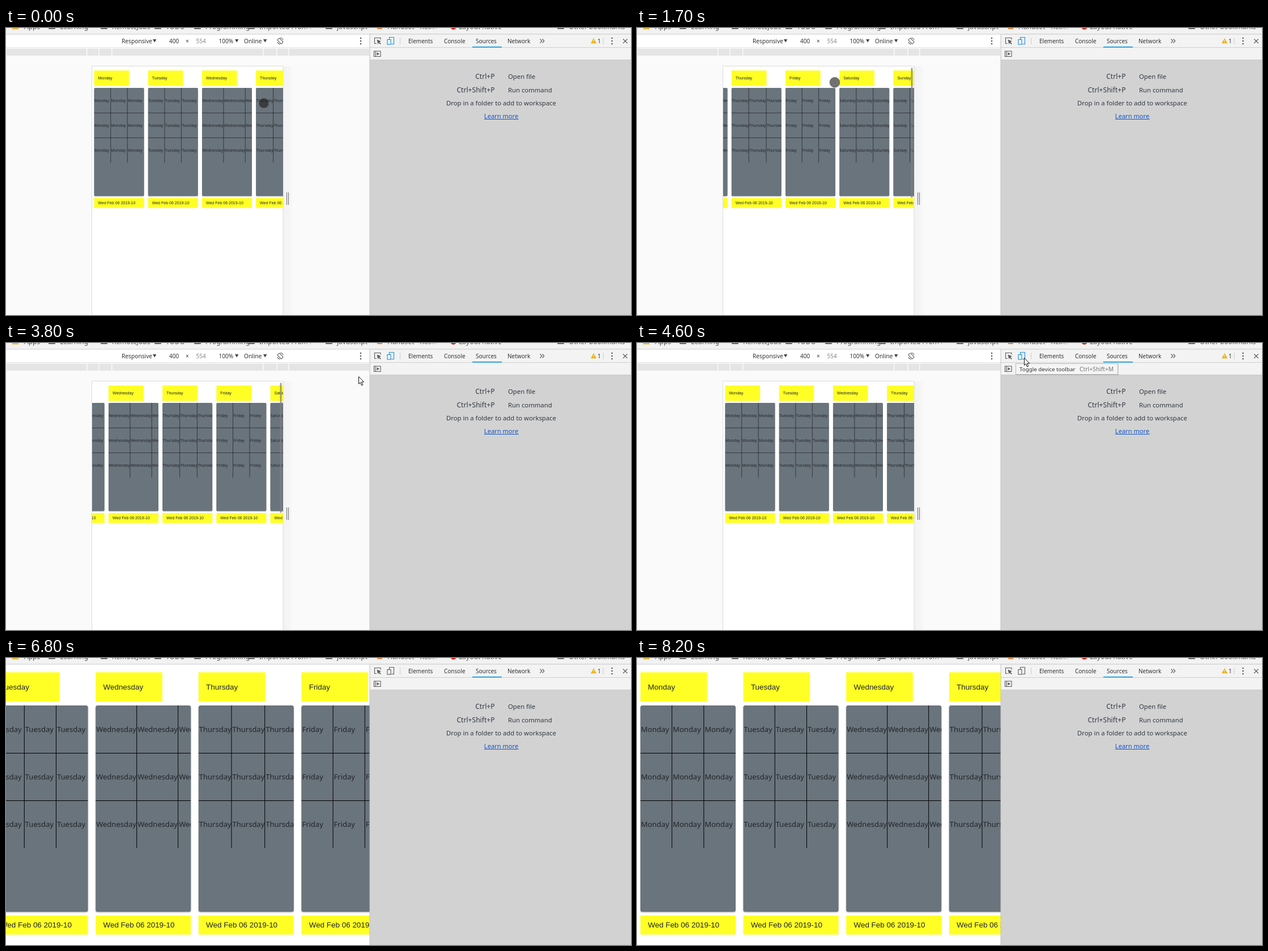
An HTML page that plays this animation: 1103 by 508 pixels, repeating every 8.7 s.

```html
<!DOCTYPE html>
<html lang="en">
<head>
<meta charset="utf-8">
<style>
  html, body { margin: 0; width: 100%; height: 100%; overflow: hidden; background: #fff; }
  svg { display: block; }
  #stage { width: 100vw; height: 100vh; }
  text { font-family: "Noto Sans", sans-serif; font-size: 10px; fill: #333; white-space: pre; }
  .day { font-size: 13px; fill: #212529; }
  .label { font: 13.44px "Liberation Sans", Arial, sans-serif; fill: #212529; }
  .body { font-size: 11.3px; fill: #303942; }
  .key { font-size: 12.1px; }
  .mark { font-size: 12px; fill: #555; }
  .size { font: 11.63px "DejaVu Sans Mono", monospace; fill: #222; }
  .grid { stroke: #000; stroke-width: 1; fill: none; }
  .card { fill: #6a747c; filter: drop-shadow(0 1px 1px rgba(0,0,0,.3)); }
  .icon { fill: none; stroke: #5a5a5a; stroke-width: 1.1; }
</style>
</head>
<body>
<svg id="stage" viewBox="0 0 1103 508" preserveAspectRatio="none">
  <defs>
    <clipPath id="phoneClip"><rect x="152" y="68" width="337" height="440"/></clipPath>
    <clipPath id="wideClip"><rect y="11" width="642" height="497"/></clipPath>
    <linearGradient id="edge"><stop stop-color="#f2f2f2"/><stop offset="1" stop-color="#f7f7f7"/></linearGradient>
    <linearGradient id="fade"><stop stop-color="#f2f2f2" stop-opacity="0"/><stop offset="1" stop-color="#f2f2f2"/></linearGradient>
  </defs>

  <g id="device"></g>
  <g id="view"><g id="page"></g></g>
  <g id="sizeTip">
    <rect x="541" y="11" width="101" height="22" fill="#fff"/>
    <text class="size" x="545" y="27">764px × 641px</text>
  </g>
  <rect id="thumb" x="483.5" y="70.5" width="3" height="230" rx="1" fill="#808080"/>
  <g id="chrome"></g>
  <g id="tools"></g>
  <g id="tooltip">
    <rect x="669" y="37" width="181" height="20" fill="#000" opacity=".12"/>
    <rect x="668.5" y="36.5" width="180" height="19" fill="#f5f5f5" stroke="#b8b8b8"/>
    <text x="675" y="49.5" style="font-size:9.8px">Toggle device toolbar</text>
    <text x="781" y="49.5" style="font-size:10.3px;fill:#777">Ctrl+Shift+M</text>
  </g>
  <g id="finger">
    <circle r="9" fill="#1c1c1c" fill-opacity=".62"/>
    <circle r="8.8" fill="none" stroke="#111" stroke-opacity=".6"/>
    <circle r="8.8" fill="none" stroke="#ccc" stroke-opacity=".75" stroke-dasharray="1.4 1.4"/>
  </g>
  <path id="arrow" d="M.5 .5V13.5L3.4 10.8L5.6 16L7.7 15.1L5.5 10H9.6Z" fill="#fff" stroke="#111"/>
</svg>
<script>
const $ = id => document.getElementById(id);
const rect = (x, y, w, h, fill, more = '') =>
  `<rect x="${x}" y="${y}" width="${w}" height="${h}" fill="${fill}" ${more}/>`;
const text = (x, y, str, cls = '', more = '') => `<text x="${x}" y="${y}" class="${cls}" ${more}>${str}</text>`;
const path = (d, more = 'class="icon"') => `<path d="${d}" ${more}/>`;
const caret = x => path(`M${x} 20h6.4l-3.2 5.6z`, 'fill="#444"');
const dots = x => [18, 23, 28].map(y => `<circle cx="${x}" cy="${y}" r="1.3" fill="#555"/>`).join('');

// Week columns
const PITCH = 181.6, CARD = 168;
const week = [['Monday', 56.2], ['Tuesday', 56.2], ['Wednesday', 73], ['Thursday', 58.7],
  ['Friday', 56.2], ['Saturday', 57], ['Sunday', 56.2]];

function column([day, w], i) {
  const x = 6 + i * PITCH;
  let cells = path(`M0 84.5H${CARD}M0 168.5H${CARD}M${w - .5} 0V252M${2 * w - .5} 0V252`, 'class="grid"');
  for (let n = 0; n < 9; n++) cells += text(1 + (n % 3) * w, 47 + 84 * (n / 3 | 0), day, 'day');
  return rect(x, 25.3, 117.6, 52, '#ffff25') + text(x + 13.3, 56, day, 'label') +
    `<rect class="card" x="${x}" y="84" width="${CARD}" height="365.3" rx="3.5"/>` +
    `<svg x="${x}" y="84" width="${CARD}" height="365">${cells}</svg>` +
    rect(x, 456, CARD, 33.5, '#ffff25') + text(x + 13.3, 477, 'Wed Feb 06 2019-10', 'label');
}
$('page').innerHTML = week.map(column).join('');

// Device emulation surroundings
const stops = [0.5, 143, 164, 187, 454, 478, 499, 642];
$('device').innerHTML = rect(0, 11, 642, 497, '#fafafa') + rect(0, 11, 642, 24, '#fff') +
  rect(0, 34, 642, 1, '#e4e4e4') +
  stops.slice(1).map((s, i) => rect(stops[i] + .5, 36.5, s - stops[i] - 1.5, 12.5, '#e5e5e5')).join('') +
  rect(489, 68, 15, 440, 'url(#edge)') +
  rect(151.5, 67.5, 337.5, 450, '#fff', 'stroke="#dcdcdc"') +
  rect(493.5, 291, 7, 22, '#ececec') + rect(495, 291, 1, 22, '#777') + rect(498, 291, 1, 22, '#777') +
  text(204, 26.7, 'Responsive', '', 'style="font-size:10.2px"') + caret(259) + text(288, 26.7, '400') +
  text(317, 26.7, '×') + text(335.5, 26.7, '554', '', 'style="fill:#888"') +
  text(375.5, 26.7, '100%') + caret(404) + text(420, 26.7, 'Online', '', 'style="font-size:10.2px"') + caret(454) +
  `<g transform="rotate(-45 484 23)">${rect(481.5, 18, 5, 10, 'none', 'class="icon" rx="1"')}</g>` +
  path('M479 25a5.500 5.500 0 0 0 5 3.500M489 21a5.500 5.500 0 0 0-5-3.500') + dots(626);

// Bookmark strip
const folders = [[75, 'Learning'], [167, 'RemoteJobs'], [262, 'TODO'], [332, 'Programming'],
  [427, 'Imported From F'], [564, 'javascript'], [973, 'Other bookmarks']];
$('chrome').innerHTML = rect(0, 0, 1103, 11, '#f2f2f2') + rect(0, 10.5, 1103, 1, '#d0d0d0') +
  rect(11, -8, 11, 10.5, '#e8b93c') + text(32, 2, 'Apps', 'mark') +
  folders.map(([x, s]) => rect(x, -7, 12, 9, '#6b6b6b', 'rx="1"') + text(x + 20, 2, s, 'mark')).join('') +
  rect(655, -7, 9, 9, '#e88a3c') + text(673, 2, 'Handset - React L', 'mark') +
  '<circle cx="789.5" cy="-2" r="5" fill="#d93025"/>' + text(799, 2, 'Layout native', 'mark') +
  rect(525, 0, 24, 10, 'url(#fade)') + rect(742, 0, 24, 10, 'url(#fade)') + rect(766, 0, 14, 10, '#f2f2f2');

// Inspector panel
const tabs = [[710, 'Elements'], [773, 'Console'], [829, 'Sources'], [885, 'Network']];
const hints = [[90, 'Ctrl+P', 'Open file'], [113.5, 'Ctrl+Shift+P', 'Run command']];
const middle = 'text-anchor="middle"';
$('tools').innerHTML = rect(642, 11, 461, 46, '#f3f3f3') + rect(642, 56, 461, 452, '#d2d2d2') +
  rect(642, 10.5, 461, 1, '#d0d0d0') + rect(642, 34, 461, 1, '#cfcfcf') + rect(642, 56, 461, 1, '#cacaca') +
  rect(641.5, 11, 1, 497, '#c4c4c4') + rect(823, 32.8, 52, 1.8, '#1a9fe0') +
  path('M661 20.5V17.5H650.5V27.5H654') +
  path('M654.5 20.5l7.5 3-3 1.2 2.8 3-1.2 1.2-2.9-2.9-1.2 3z', 'fill="#5a5a5a"') +
  '<g id="toggle" class="icon">' + path('M676.5 20V16.5H684.5V28.5H680', '') + rect(673, 20.5, 6, 8.5, 'none') + '</g>' +
  rect(695, 17, 1, 12, '#ccc') + tabs.map(([x, s]) => text(x, 26.7, s)).join('') +
  path('M942.5 19.5l3.3 3.5-3.3 3.5M946.5 19.5l3.3 3.5-3.3 3.5') +
  path('M1037 18l5 9.2h-10z', 'fill="#f0ae0c"') + rect(1036.5, 21, 1, 3, '#fff') + rect(1036.5, 25, 1, 1, '#fff') +
  text(1044, 26.7, '1') + rect(1053.5, 17, 1, 12, '#ccc') + dots(1069.5) +
  path('M1089 19.5l7.5 7.5M1096.5 19.5l-7.5 7.5') +
  path('M649.5 41h11.5v9.5h-11.5zM652.2 41v9.5') + path('M654.5 43v5.5l4.5-2.75z', 'fill="#5a5a5a"') +
  hints.map(([y, k, s]) => text(862.5, y, k, 'body key', 'text-anchor="end"') + text(886, y, s, 'body')).join('') +
  text(874, 137, 'Drop in a folder to add to workspace', 'body', middle) +
  text(874, 160, 'Learn more', 'body', middle + ' style="fill:#1155cc;font-size:11.1px"') +
  rect(844, 161, 60.5, 1, '#1155cc');

// Tracks: [ms, values...], either blended or held
const swipe = [[0, 0], [700, 0], [1100, 158.2], [1600, 256], [2000, 329.2]];
const touch = [[100, 455, 133], [500, 464, 94], [700, 464, 94], [1100, 400, 97],
  [1600, 350, 96], [2000, 346, 97], [2100, 346, 97], [2500, 331.5, 92]];
const jumps = [[0, 0], [3800, 165], [4100, 0], [6800, 211], [7300, 628], [8200, 0]];
const pointer = [[0, -50, -50], [3800, 622, 59], [4100, 693, 18], [4600, 683, 26], [5100, 456, 100],
  [5500, 462, 85], [5900, 381, 494], [6800, -50, -50]];

const held = (keys, t) => keys.filter(k => k[0] <= t).pop().slice(1);
function blend(keys, t) {
  const i = keys.findIndex(k => k[0] > t);
  if (i < 1) return (i ? keys[keys.length - 1] : keys[0]).slice(1);
  const a = keys[i - 1], b = keys[i], p = (t - a[0]) / (b[0] - a[0]);
  return a.slice(1).map((v, n) => v + (b[n + 1] - v) * p);
}
const show = (id, on) => $(id).setAttribute('display', on ? 'inline' : 'none');
const move = (id, [x, y]) => $(id).setAttribute('transform', `translate(${x} ${y})`);

function draw(ms) {
  const t = Math.floor(ms / 100) * 100;
  const phone = t < 5100, touching = t < 3800;
  const [scroll] = touching ? blend(swipe, t) : held(jumps, t);

  show('device', phone);
  $('view').setAttribute('clip-path', `url(#${phone ? 'phoneClip' : 'wideClip'})`);
  $('page').setAttribute('transform', phone
    ? `translate(${152.4 - scroll} 67.75) scale(.5242) translate(0 -11)`
    : `translate(${-scroll} 0)`);

  let bar = 0;
  if (t >= 800 && t < 2500) bar = Math.min(1, (2500 - t) / 400);
  if (t >= 3800 && t < 4600) bar = 1;
  $('thumb').setAttribute('opacity', .75 * bar);

  show('finger', touching);
  move('finger', blend(touch, t));
  move('arrow', held(pointer, t));
  show('tooltip', t >= 4600 && phone);
  show('sizeTip', !phone && t < 5900);
  $('toggle').style.stroke = phone ? '#1a8fe0' : '#5a5a5a';
}

const start = performance.now();
function tick() {
  draw((performance.now() - start) % 8700);
  requestAnimationFrame(tick);
}
tick();
</script>
</body>
</html>
```
